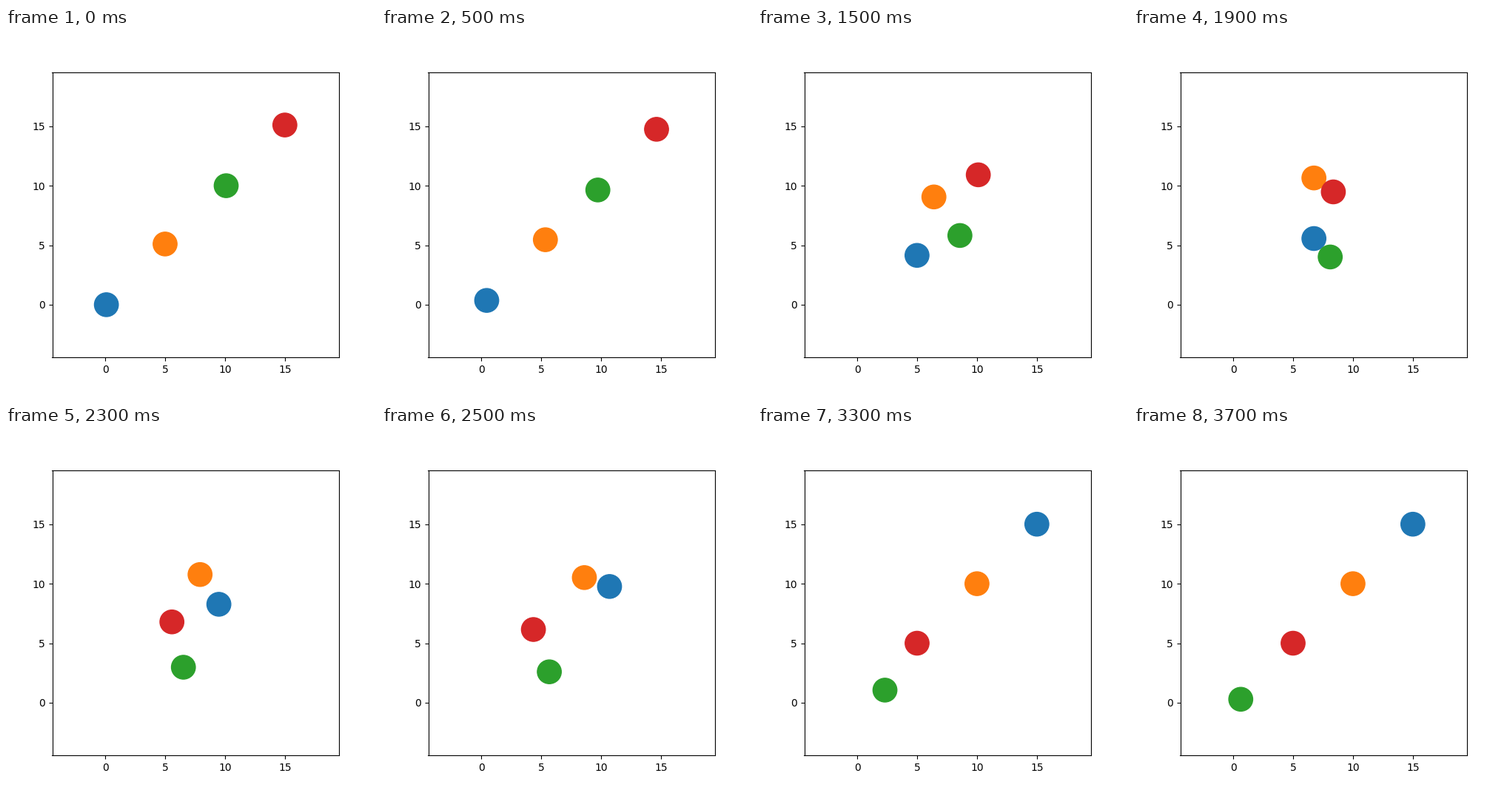
A matplotlib script for the animation above (3900 ms loop, 500x500 px).

```python
import numpy as np
import matplotlib.pyplot as plt
from matplotlib.animation import FuncAnimation

INTERVAL, FRAMES = 100, 39
HOLD, STEP = 5, 2   # frames in the opening pose, frames per later pose
RAMP = 4            # poses spent speeding up
FIRST_MOVE = 0.36   # opening move along each axis, straight at the goal

# Per agent: goal on the diagonal, arrival pose, detour points (pose, x, y).
AGENTS = [
    (15, 14.5, [(4, 3.25, 2.73), (8, 6.74, 5.56), (10, 9.49, 8.27)]),
    (10, 13, [(4, 6.07, 7.46), (8, 6.74, 10.65), (9, 7.35, 11.01),
              (10, 7.92, 10.77)]),
    (0, 17.75, [(4, 9.05, 7.62), (8, 8.10, 4.01), (10, 6.53, 2.98)]),
    (5, 14.7, [(4, 11.86, 12.35), (8, 8.36, 9.48), (10, 5.57, 6.79),
               (11, 4.36, 6.15), (12, 3.56, 5.53)]),
]


def travel(pose):
    """Time along the path: eases in, then runs evenly."""
    return RAMP * (pose / RAMP) ** 1.5 if pose < RAMP else pose


def make_path(index, goal, arrival, detour):
    x, y = 5 * index + 0.1 * (1 - index % 2), 5 * index + 0.1 * (index % 2)
    move = FIRST_MOVE * np.sign(goal - x)
    points = [(0, x, y), (travel(1), x + move, y + move),
              *detour, (arrival, goal, goal)]
    return np.array(points).T


def position(path, pose):
    times, xs, ys = path
    t = travel(pose)
    return np.interp(t, times, xs), np.interp(t, times, ys)


fig, ax = plt.subplots(figsize=(5, 5), dpi=100)
ax.set(xlim=(-4.42, 19.52), ylim=(-4.42, 19.52))

paths = [make_path(i, *agent) for i, agent in enumerate(AGENTS)]
dots = [ax.add_patch(plt.Circle(position(path, 0), 1, color=f"C{i}"))
        for i, path in enumerate(paths)]


def update(frame):
    pose = 0 if frame < HOLD else 1 + (frame - HOLD) // STEP
    for dot, path in zip(dots, paths):
        dot.center = position(path, pose)
    return dots


anim = FuncAnimation(fig, update, frames=FRAMES, interval=INTERVAL,
                     repeat=True, repeat_delay=0)
plt.show()
```
